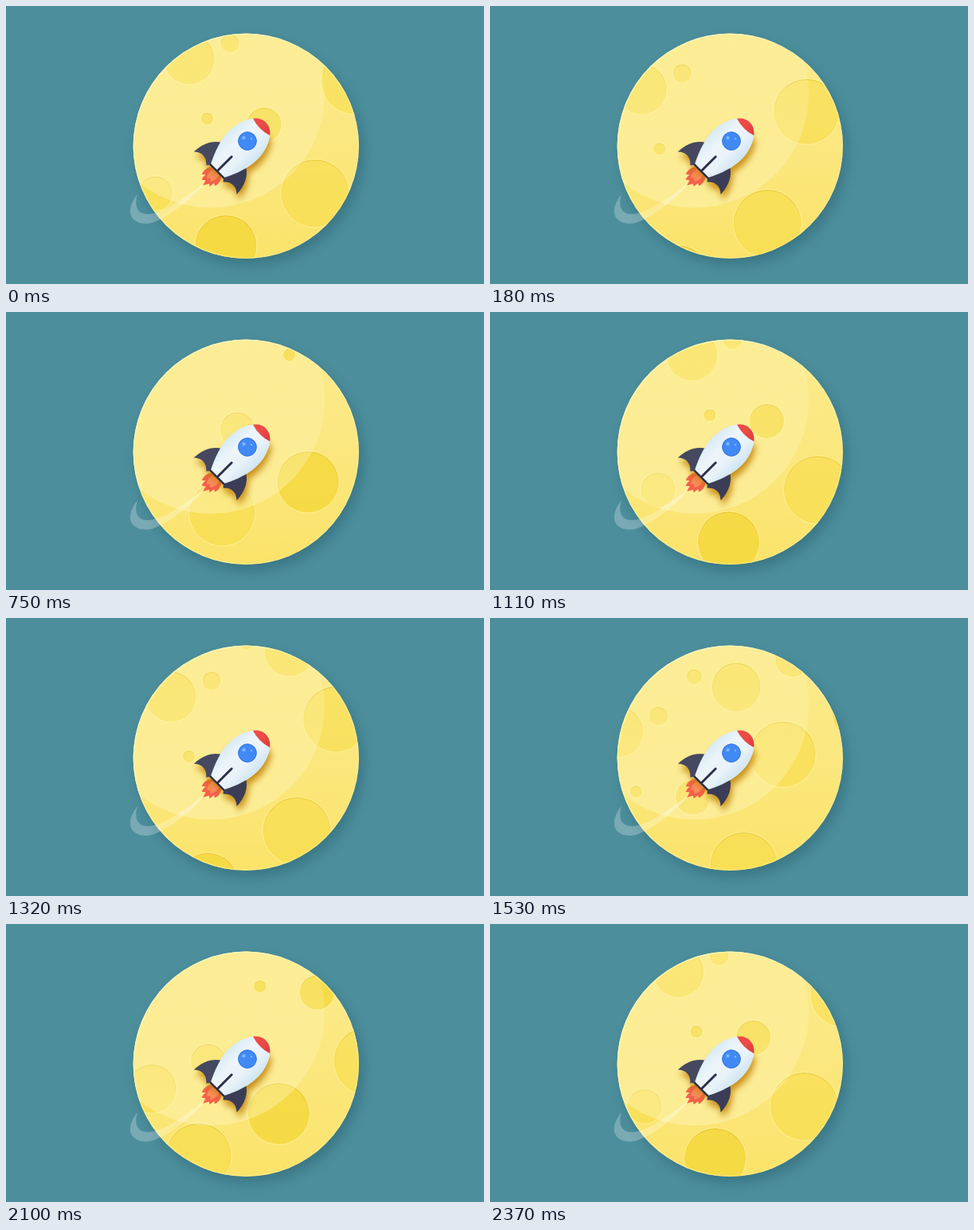
Recreate the animation shown at these times as an HTML page with a canvas. Size 600 by 350 pixels, loop 2.4 s.

```html
<!DOCTYPE html>
<html lang="en">
<head>
<meta charset="utf-8">
<title>Rocket over the moon</title>
<style>
  html, body { margin: 0; width: 100%; height: 100%; overflow: hidden; background: #4c8e9c; }
  canvas { display: block; }
</style>
</head>
<body>
<canvas id="stage" width="600" height="350"></canvas>
<script>
const ctx = document.getElementById('stage').getContext('2d');
const STEP = 30, STEPS = 80, VX = -6.63, VY = 6.33;
const MOON = { x: 301.3, y: 176.3, r: 141.7 };
const SHALLOW = .48, DEEP = .85;

const crater = (x, y, r, depth = SHALLOW) => ({ x, y, r, depth });

// One field of craters drifts past twice per loop, the second time a little offset
const field = [
  crater(230, 67, 32), crater(281, 47, 12), crater(324, 149.5, 22, DEEP),
  crater(388, 236, 43), crater(437, 95, 41.5), crater(187.5, 236, 22),
  crater(276, 302, 39, DEEP), crater(252.5, 142, 8, DEEP)
];
const extras = [crater(402, -1.5, 31), crater(349, -14.5, 10)];
const passes = [
  { at: 0, dx: 0, dy: 0, craters: field },
  { at: 37, dx: 23.5, dy: -12, craters: field },
  { at: 37, dx: 0, dy: 0, craters: extras }
];

function circle(x, y, r) {
  ctx.beginPath();
  ctx.arc(x, y, r, 0, Math.PI * 2);
}

function fill(path, style) {
  ctx.fillStyle = style;
  ctx.fill(new Path2D(path));
}

function fillCircle(x, y, r, style) {
  circle(x, y, r);
  ctx.fillStyle = style;
  ctx.fill();
}

function strokeCircle(x, y, r, style, width) {
  circle(x, y, r);
  ctx.strokeStyle = style;
  ctx.lineWidth = width;
  ctx.stroke();
}

function gradient(x0, y0, x1, y1, ...colors) {
  const g = ctx.createLinearGradient(x0, y0, x1, y1);
  colors.forEach((c, i) => g.addColorStop(i / (colors.length - 1), c));
  return g;
}

function shadow(color, blur, dx, dy) {
  ctx.shadowColor = color;
  ctx.shadowBlur = blur;
  ctx.shadowOffsetX = dx;
  ctx.shadowOffsetY = dy;
}

function drawCrater(x, y, { r, depth }) {
  fillCircle(x, y, r, `rgba(246,217,62,${depth})`);
  strokeCircle(x, y, r - 1, gradient(x, y - r, x, y + r,
    'rgba(222,186,40,.55)', 'rgba(235,200,60,.2)', 'rgba(250,230,120,0)'), 1.5);
  strokeCircle(x, y, r, 'rgba(255,244,165,.75)', 1);
}

function drawMoon(step) {
  const { x, y, r } = MOON;
  ctx.save();
  shadow('rgba(25,75,90,.36)', 16, 5, 8);
  fillCircle(x, y, r, gradient(0, y - r, 0, y + r, '#fceb8e', '#fbe77e', '#fbe36a'));
  ctx.restore();

  ctx.save();
  circle(x, y, r);
  ctx.clip();
  for (const { at, dx, dy, craters } of passes) {
    const drift = (step - at + STEPS * 1.5) % STEPS - STEPS / 2;
    for (const c of craters) drawCrater(c.x + dx + VX * drift, c.y + dy + VY * drift, c);
  }
  fillCircle(257, 111, 143, gradient(0, 34, 0, 254, 'rgba(255,250,200,.14)', 'rgba(255,250,205,.38)'));
  strokeCircle(x, y, r - .5, gradient(x - r, y - r, x + r, y + r,
    'rgba(255,252,215,.8)', 'rgba(255,248,185,.5)', 'rgba(255,240,150,.4)'), 1.6);
  ctx.restore();
}

function drawTrail() {
  fill('M252 220 C236 240 206 266 183 273 C166 277 155 268 156 258 C156 250 161 242 165 237 ' +
    'C161 250 164 258 171 261 C181 265 200 257 212 249 Q236 234 252 220Z',
    gradient(160, 260, 252, 220, 'rgba(255,255,255,.25)', 'rgba(255,255,255,.25)', 'rgba(255,255,255,.45)'));
}

function drawFlame() {
  fill('M-9 55 Q-14 62 -11 70 L-7 67 Q-8 72 -6 75 L-2 72 L0 79 L4 72 L7 74 L8 67 L11 69 Q14 62 9 55Z', '#f4604a');
  fill('M-5 55 Q-8 63 -3 69 L0 66 L3 69 Q8 62 5 55Z', '#fb8a5a');
}

function drawRocket() {
  const body = 'M-15 -25 C-30 -4 -28 22 -12 53 L12 53 C28 22 30 -4 15 -25Z';
  const cap = 'M-15 -25 C-10 -31 -5 -33 0 -33 C5 -33 10 -31 15 -25 Q0 -20 -15 -25Z';
  const fin = 'M-21 24 C-31 29 -38 42 -38 57 C-31 50 -22 50 -15 58 L-11 53Z';

  ctx.save();
  ctx.translate(303, 170);
  ctx.rotate(Math.PI / 4);
  drawFlame();

  ctx.save();
  shadow('rgba(190,125,0,.85)', 8, 2, 7);
  fill(body, '#e8f2f9');
  for (const color of ['#45485f', '#3a3d55']) {
    fill(fin, color);
    ctx.scale(-1, 1);
  }
  ctx.restore();

  fill(body, gradient(-25, 0, 25, 0, '#d8ebf6', '#edf5fa', '#e9f2f9', '#cfe5f2'));
  fill(cap, gradient(-15, 0, 15, 0, '#ee4b47', '#ec4a46', '#d83a3d'));
  ctx.fillStyle = '#2d3047';
  ctx.fillRect(-12.5, 52.5, 25, 2.5);
  ctx.beginPath();
  ctx.roundRect(-1.5, 26.5, 3, 27, 1.5);
  ctx.fill();
  ctx.restore();

  fillCircle(303, 170, 11.5, '#418af6');
  strokeCircle(303, 170, 11.3, '#3674dc', 1);
  fillCircle(298.5, 166, 2.2, '#78b6ff');
  fillCircle(308, 167, 1.2, '#78b6ff');
}

function draw(now) {
  const step = Math.floor(now / STEP) % STEPS;
  ctx.fillStyle = '#4c8e9c';
  ctx.fillRect(0, 0, 600, 350);
  drawMoon(step);
  drawTrail();
  drawRocket();
  requestAnimationFrame(draw);
}

requestAnimationFrame(draw);
</script>
</body>
</html>
```
